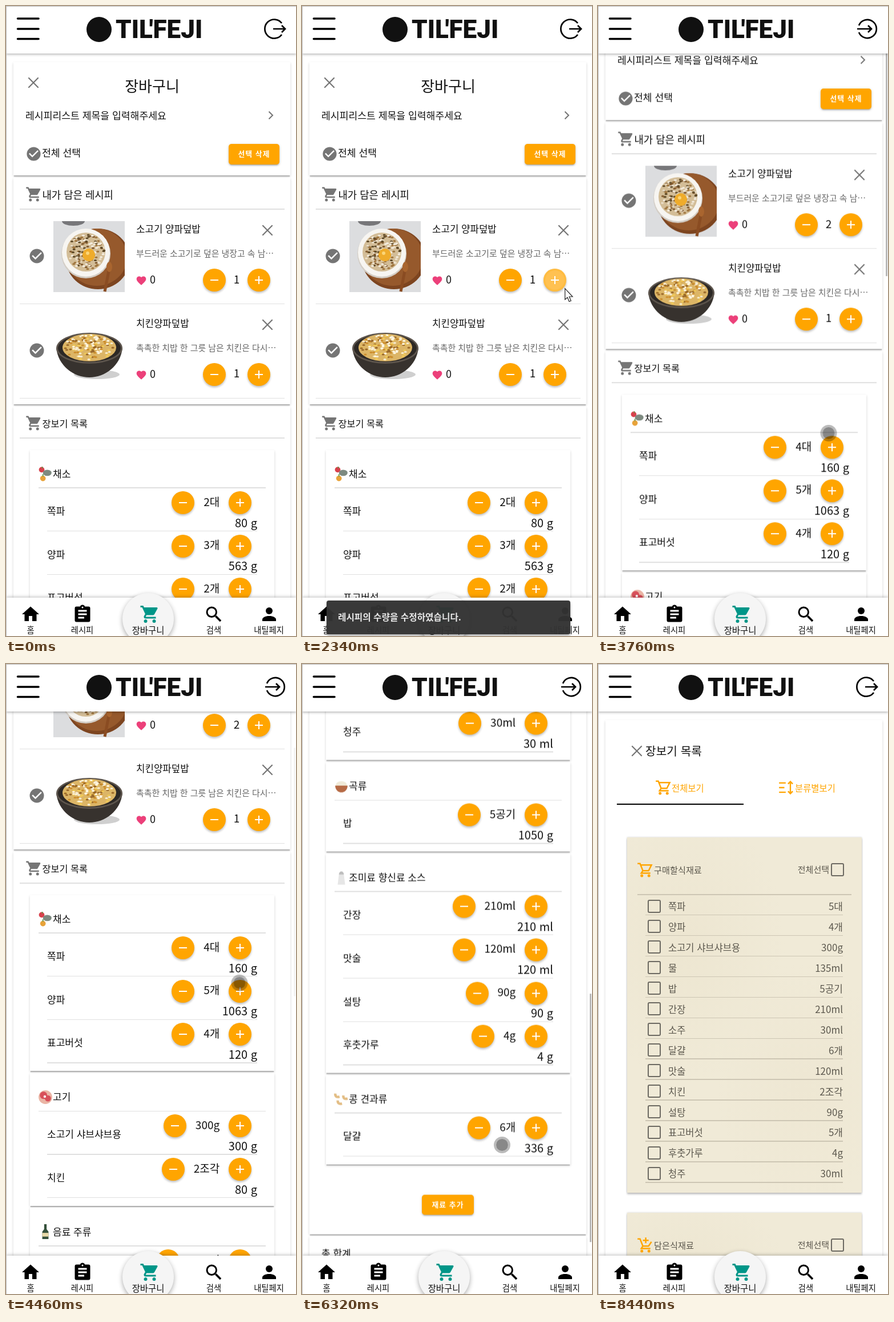
Animation, 508 px wide and 1101 px high, one loop 8.7 s. Source, as an HTML page:

```html
<!DOCTYPE html>
<html lang="ko">
<head>
<meta charset="utf-8">
<title>장바구니</title>
<style>
html, body { margin: 0; width: 100%; height: 100%; overflow: hidden; background: #fff; }
body { font-family: "Noto Sans CJK KR", "Noto Sans CJK JP", "Noto Sans CJK", sans-serif; color: #111; }
#stage { position: relative; width: 508px; height: 1101px; overflow: hidden; }
#stage div { position: absolute; box-sizing: border-box; }
#stage svg { display: block; width: 100%; height: 100%; overflow: visible; }
#stage .t { white-space: pre; line-height: 30px; margin-top: -16px; }
.page, .layer { left: 0; top: 0; width: 508px; height: 2800px; }
.card { background: #fff; box-shadow: 0 3px 1px -1px #0003, 0 2px 4px #0000002e; }
.line { background: #e0e0e0; }
.btn { background: #ffa500; border-radius: 5px; color: #fff; font-weight: 700; letter-spacing: 1.1px; text-align: center;
  box-shadow: 0 3px 2px -2px #0003, 0 2px 3px #0002, 0 1px 5px #0002; }
#stage .qty { display: flex; align-items: center; height: 40px; }
#stage .qty > * { position: static; }
.qty span { font-size: 19px; line-height: 30px; margin-top: -5px; }
.rnd { width: 40px; height: 40px; padding: 8px; border-radius: 50%; background: #ffa500;
  box-shadow: 0 3px 4px -1px #0003, 0 2px 4px #0002; }
.ripple { border-radius: 50%; background: radial-gradient(#fff 16px, #fffc 17px); }
.photo { overflow: hidden; }
.paper { background: radial-gradient(ellipse at 25% 30%, #ede6d1, #0000 40%), radial-gradient(ellipse at 75% 70%, #eee7d3, #0000 35%), #f0ead7;
  box-shadow: 0 3px 3px #0003, 0 0 3px #0003; color: #5c584e; }
.paper .line { background: #cdc6b4; }
.check { border: 2px solid #6d6a62; border-radius: 3px; }
#header { left: 0; top: 0; width: 508px; height: 83px; background: #fff; box-shadow: 0 2px 4px #0004; }
#nav { left: 0; top: 1034px; width: 508px; height: 67px; background: #fff; box-shadow: 0 -2px 5px #0003; }
.disc { border-radius: 50%; background: #f5f5f5; box-shadow: 0 3px 8px #0005; }
.snack { background: #333; border-radius: 4px; color: #e8e8e8; box-shadow: 0 3px 5px #0005; }
.touch { border-radius: 50%; background: #0007; background-clip: padding-box; border: 4px solid #0004; }
.thumb { background: #b9b9b9; }
.edge { border: solid #bbb; border-width: 1px 0 0 1px; }
</style>
</head>
<body>
<div id="stage"></div>
<script>
const LOOP = 8700, ORANGE = '#ffa500', GRAY = '#757575';
const stage = document.getElementById('stage');

// ---- drawing helpers ----
function add(parent, cls, x, y, w, h) {
  const el = document.createElement('div');
  el.className = cls;
  if (x !== undefined) Object.assign(el.style, { left: x + 'px', top: y + 'px', width: w + 'px', height: h + 'px' });
  parent.append(el);
  return el;
}
function text(parent, str, x, y, size = 17, align = 'l', color = '', weight = 400) {
  const el = add(parent, 't');
  el.textContent = str;
  Object.assign(el.style, { left: x + 'px', top: y + 'px', fontSize: size + 'px', color, fontWeight: weight });
  if (align !== 'l') el.style.transform = `translateX(${align === 'c' ? -50 : -100}%)`;
  return el;
}
function art(parent, x, y, w, h, body, view = `0 0 ${w} ${h}`, attrs = '') {
  const el = add(parent, '', x, y, w, h);
  el.innerHTML = `<svg viewBox="${view}" ${attrs}>${body}</svg>`;
  return el;
}
const icon = (p, x, y, size, body, color = GRAY) =>
  art(p, x - size / 2, y - size / 2, size, size, body, '0 0 24 24', `fill="${color}"`);
const stroke = (d, color, width = 2) => `<path d="${d}" fill="none" stroke="${color}" stroke-width="${width}"/>`;
const fill = d => `<path d="${d}"/>`;
const dot = (x, y, rx, color, ry = rx) => `<ellipse cx="${x}" cy="${y}" rx="${rx}" ry="${ry}" fill="${color}"/>`;
const line = (p, x1, x2, y) => add(p, 'line', x1, y - .7, x2 - x1, 1.4);
const cross = (p, x, y, color = GRAY) => icon(p, x, y, 32, stroke('M5.5 5.5L18.5 18.5M18.5 5.5L5.5 18.5', color, 1.6));
function button(p, label, x, y, w, h, size) {
  const el = add(p, 'btn', x, y, w, h);
  Object.assign(el.style, { fontSize: size + 'px', lineHeight: h - 2 + 'px' });
  el.textContent = label;
}

const ICON = {
  cart: fill('M17,18C15.9,18 15,18.9 15,20A2,2 0 0,0 19,20C19,18.9 18.1,18 17,18M1,2V4H3L6.6,11.6L5.2,14C5.1,14.3 5,14.6 5,15A2,2 0 0,0 7,17H19V15H7.4A.25,.25 0 0,1 7.2,14.6L8.1,13H15.5C16.3,13 17,12.6 17.3,12L20.9,5.5A1,1 0 0,0 20,4H5.2L4.3,2M7,18C5.9,18 5,18.9 5,20A2,2 0 0,0 9,20C9,18.9 8.1,18 7,18Z'),
  home: fill('M10,20V14H14V20H19V12H22L12,3L2,12H5V20H10Z'),
  clip: fill('M17,9H7V7H17M17,13H7V11H17M14,17H7V15H14M12,3A1,1 0 0,1 12,5A1,1 0 0,1 12,3M19,3H14.8C14.4,1.8 13.3,1 12,1C10.7,1 9.6,1.8 9.2,3H5A2,2 0 0,0 3,5V19A2,2 0 0,0 5,21H19A2,2 0 0,0 21,19V5A2,2 0 0,0 19,3Z'),
  find: stroke('M14.2 14.2L20 20', '#000', 2.4) + '<circle cx="9.5" cy="9.5" r="5.5" fill="none" stroke="#000" stroke-width="2"/>',
  user: dot(12, 8, 4, '#000') + fill('M12,14C16.4,14 20,15.8 20,18V20H4V18C4,15.8 7.6,14 12,14Z'),
  checked: dot(12, 12, 10, GRAY) + stroke('M5.7 11.3L10 15.6L18.3 7.3', '#fff'),
  unchecked: `<circle cx="12" cy="12" r="9" fill="none" stroke="${GRAY}" stroke-width="1.7"/>` + stroke('M7 12L10.5 15.5L17 8.5', GRAY, 1.7),
  heart: fill('M12,21.3L10.5,20C5.4,15.4 2,12.3 2,8.5C2,5.4 4.4,3 7.5,3C9.2,3 10.9,3.8 12,5.1C13.1,3.8 14.8,3 16.5,3C19.6,3 22,5.4 22,8.5C22,12.3 18.6,15.4 13.4,20Z'),
  trolley: stroke('M1 3H4.5L8.5 13H16.5L20.5 5H6M8.5 13L6.3 16.3H19', ORANGE) + dot(7, 20, 2, ORANGE) + dot(17, 20, 2, ORANGE),
  trolleyPlus: stroke('M1 3H4.5L8.5 13H16.5L20.5 7M8.5 13L6.3 16.3H19M12.5 1V9M8.5 5H16.5', ORANGE) + dot(7, 20, 2, ORANGE) + dot(17, 20, 2, ORANGE),
  sort: stroke('M1 5H11M1 12H9M1 19H11M18 3V21M14.5 6.5L18 3L21.5 6.5M14.5 17.5L18 21L21.5 17.5', ORANGE),
  minus: stroke('M5 12H19', '#fff'),
  plus: stroke('M5 12H19M12 5V19', '#fff'),
};
const FOOD = {
  veg: dot(6, 5, 4.5, '#d8414c') + dot(15, 10, 7, '#7d8a80', 5) + dot(8, 19, 4.5, '#e8a33a') + stroke('M7 0V3M8 12V16', '#5f9a4a', 1.5),
  meat: dot(12, 12, 11, '#eab5a5') + dot(9, 9, 6, '#d8505a') + dot(16, 14, 5, '#d8505a') + dot(11, 11, 2, '#fff'),
  bottle: '<path d="M10 0H14V8L17 12V24H7V12L10 8Z" fill="#35513b"/><path d="M7 14H17V20H7Z" fill="#e8d9a8"/>',
  rice: dot(12, 10, 9, '#f0ead8', 6) + '<path d="M2 11H22C22 18 17 22 12 22S2 18 2 11Z" fill="#b66a45"/>',
  salt: '<path d="M8 7H16L18 23H6Z" fill="#e6e6e6"/><path d="M8 7C8 0 16 0 16 7Z" fill="#bdbdbd"/>',
  nuts: [[5, 6], [18, 9], [9, 17]].map(([x, y]) => stroke(`M${x - 3} ${y - 3}Q${x - 3} ${y + 4} ${x + 4} ${y + 2}`, '#e3bd84', 4)).join(''),
};

let seed = 7;
const rnd = () => (seed = seed * 16807 % 2147483647) / 2147483647;
function crumbs(n, cx, cy, rx, ry, colors) {
  let out = '';
  for (let i = 0; i < n; i++) {
    const a = rnd() * 6.283, r = Math.sqrt(rnd());
    out += dot((cx + Math.cos(a) * r * rx).toFixed(1), (cy + Math.sin(a) * r * ry).toFixed(1), 2.6, colors[i % colors.length], 1.6);
  }
  return out;
}
const PHOTO = [
  '<path d="M0 0H125V124H0Z" fill="#dcdddf"/>' + dot(35, 0, 20, '#77777a', 8) + dot(78, 66, 56, '#7d4520', 53) + dot(76, 63, 53, '#96592c', 50) +
  dot(57, 57, 43, '#d3cdc5') + dot(57, 55, 42, '#f7f5f1') + dot(57, 54, 34, '#d3bd97') +
  crumbs(150, 57, 54, 32, 31, ['#80592f', '#f4ede0', '#a0763f', '#5f4a28', '#ece0ca']) + dot(62, 59, 11, '#efac2b') + dot(60, 56, 3, '#fbd678') +
  stroke('M98 82L90 123', '#8a4c22', 5) + dot(98, 80, 5, '#a9652f', 9),
  dot(76, 103, 40, '#cfcfcf', 8) + '<path d="M5 56C8 88 36 108 63 108S118 88 121 56Z" fill="#37322e"/>' +
  dot(63, 57, 58, '#5d554d', 27) + dot(63, 57, 55, '#2c2825', 24) + dot(63, 56, 47, '#dcb566', 24) +
  crumbs(140, 63, 56, 45, 22, ['#f6ecd2', '#cc8d2c', '#f1ca57', '#99682a', '#fff6e0']),
];

// ---- motion helpers ----
function play(el, prop, steps) {
  const frames = steps.map(([t, v, easing = 'linear']) => ({ offset: t / LOOP, [prop]: v, easing }));
  if (steps[0][0] > 0) frames.unshift({ ...frames[0], offset: 0, easing: 'step-end' });
  if (steps.at(-1)[0] < LOOP) frames.push({ ...frames.at(-1), offset: 1 });
  el.animate(frames, { duration: LOOP, iterations: Infinity });
}
const show = (el, steps) => play(el, 'opacity', steps.map(([t, v]) => [t, v, 'step-end']));
const move = (el, steps) => play(el, 'transform', steps.map(([t, x, y, e]) => [t, `translate(${x}px,${y}px)`, e]));
const during = (el, from, to) => show(el, [[0, from ? 0 : 1], ...(from ? [[from, 1]] : []), ...(to < LOOP ? [[to, 0]] : [])]);

// Stepper whose label changes at the given times: [time, count, weight]
function stepper(p, right, y, gap, states) {
  states.forEach(([t, count, weight], i) => {
    const g = add(p, 'layer');
    const q = add(g, 'qty');
    Object.assign(q.style, { right: 508 - right + 'px', top: y - 20 + 'px', gap: gap + 'px' });
    q.innerHTML = ['minus', 'plus'].map(k => `<div class="rnd"><svg viewBox="0 0 24 24">${ICON[k]}</svg></div>`).join(`<span>${count}</span>`);
    if (weight) text(g, weight, right + 10, y + 35.5, 20, 'r', '', 300);
    if (states.length > 1) during(g, t, i + 1 < states.length ? states[i + 1][0] : LOOP);
  });
}
function tap(p, x, y, from, to, level = .32) {
  const r = add(p, 'ripple', x - 20, y - 20, 40, 40);
  play(r, 'opacity', [[from, 0], [from + 90, level], [to, level], [to + 200, 0]]);
}

// ---- cart pages ----
function topCard(p, mark) {
  add(p, 'card', 13, 98, 485, 198);
  cross(p, 48, 134);
  text(p, '장바구니', 256, 140, 26, 'c');
  text(p, '레시피리스트 제목을 입력해주세요', 34, 192, 17.2);
  icon(p, 464, 191, 24, stroke('M8.5 5.5L15 12L8.5 18.5', GRAY));
  icon(p, 48, 258, 29, mark);
  text(p, '전체 선택', 63, 257, 17.2);
  button(p, '선택 삭제', 390, 241, 89, 36, 12.8);
}
function heading(p, label, y, size) {
  icon(p, 49, y - 1, 30, ICON.cart);
  text(p, label, 63.5, y, size);
  line(p, 24, 488, y + 25);
}
function totals(p, y, dishes, items) {
  add(p, 'card', 13, y, 485, 168);
  text(p, '총 합계', 34, y + 31);
  [['총 요리 수', dishes], ['총 재료 수', items]].forEach(([label, n], i) => {
    line(p, 24, 488, y + 56 + i * 51);
    text(p, label, 34, y + 82 + i * 51);
    text(p, n, 478, y + 82 + i * 51, 18, 'r');
  });
  button(p, '장보기', 14, y + 182, 484, 54, 14);
}

const cart = add(stage, 'page');
topCard(cart, ICON.checked);
add(cart, 'card', 13, 300, 485, 396);
heading(cart, '내가 담은 레시피', 330, 17.8);
[['소고기 양파덮밥', '부드러운 소고기로 덮은 냉장고 속 남…', [[0, 1], [2410, 2]]],
 ['치킨양파덮밥', '촉촉한 치밥 한 그릇 남은 치킨은 다시…', [[0, 1]]]].forEach(([name, note, count], i) => {
  const y = 356 + i * 164.7;
  icon(cart, 53.5, y + 81, 30, ICON.checked);
  art(cart, 83, y + 20, 125, 124, PHOTO[i]).className = 'photo';
  text(cart, name, 228, y + 34, 16.8);
  cross(cart, 458, y + 36);
  text(cart, note, 228, y + 77, 14.9, 'l', '#666');
  icon(cart, 237, y + 124, 20, ICON.heart, '#ec407a');
  text(cart, '0', 252, y + 122, 18);
  stepper(cart, 463, y + 123, 13.7, count);
  line(cart, 24, 488, y + 164.5);
});
add(cart, 'card', 13, 700, 485, 1759);
heading(cart, '장보기 목록', 730, 16.3);

const GROUPS = [
  ['채소', 'veg', [
    ['쪽파', [[0, '2대', '80 g'], [2410, '4대', '160 g'], [4760, '5대', '200 g']]],
    ['양파', [[0, '3개', '563 g'], [2410, '5개', '1063 g'], [5760, '4개', '813 g']]],
    ['표고버섯', [[0, '2개', '60 g'], [2410, '4개', '120 g'], [5500, '5개', '150 g']]]]],
  ['고기', 'meat', [
    ['소고기 샤브샤브용', [[0, '150g', '150 g'], [2410, '300g', '300 g']]],
    ['치킨', [[0, '2조각', '80 g']]]]],
  ['음료 주류', 'bottle', [
    ['물', [[0, '135ml', '135 ml']]], ['소주', [[0, '30ml', '30 ml']]], ['청주', [[0, '30ml', '30 ml']]]]],
  ['곡류', 'rice', [['밥', [[0, '5공기', '1050 g']]]]],
  ['조미료 향신료 소스', 'salt', [
    ['간장', [[0, '210ml', '210 ml']]], ['맛술', [[0, '120ml', '120 ml']]],
    ['설탕', [[0, '90g', '90 g']]], ['후춧가루', [[0, '4g', '4 g']]]]],
  ['콩 견과류', 'nuts', [['달걀', [[0, '6개', '336 g']]]]],
];
let top0 = 775.5;
for (const [label, pic, rows] of GROUPS) {
  const h = 84.2 + rows.length * 75.7;
  add(cart, 'card', 42, top0, 428, h - 3.5);
  icon(cart, 69, top0 + 42, 26, FOOD[pic]);
  text(cart, label, 82, top0 + 42.5);
  line(cart, 57, 455, top0 + 66.5);
  rows.forEach(([name, states], i) => {
    const y = top0 + 66.5 + i * 75.7;
    text(cart, name, 72, y + 41);
    stepper(cart, 430, y + 26, 15.8, states);
    line(cart, 72, 440, y + 75.7);
  });
  top0 += h;
}
button(cart, '재료 추가', 210, 2390, 91, 35, 12.8);
totals(cart, 2462, '2', '14');
tap(cart, 443, 479, 1900, 2450);
tap(cart, 410, 868, 4660, 5420, .27);
tap(cart, 410, 1019, 5390, 5640);
tap(cart, 311, 943, 5690, 5780);
show(cart, [[0, 1], [2870, 0], [3140, 1], [7400, 0]]);

const END = 1693;
move(cart, [[3280, 0, 0, 'ease-in'], [3760, 0, -96], [4120, 0, -372], [6010, 0, -372, 'cubic-bezier(.3,.1,.4,1)'], [6530, 0, -END]]);

const empty = add(stage, 'page');
topCard(empty, ICON.unchecked);
const none = add(empty, 'layer');
add(none, 'card', 13, 325, 485, 129);
heading(none, '내가 담은 레시피', 359, 17.8);
text(none, '담긴 레시피가 없습니다.', 256, 416, 17.4, 'c');
add(none, 'card', 13, 458, 485, 216);
heading(none, '장보기 목록', 489, 16.3);
text(none, '담긴 재료가 없습니다.', 256, 546, 17.4, 'c');
button(none, '재료 추가', 210, 604, 91, 35, 12.8);
totals(none, 677, '0', '0');
during(empty, 2870, 3140);
play(none, 'opacity', [[2870, .2], [3010, .76], [3080, 1]]);

// ---- shopping list page ----
const list = add(stage, 'page');
add(list, 'card', 13, 98, 485, 1500);
cross(list, 68, 152);
text(list, '장보기 목록', 83, 152, 20.3);
icon(list, 115, 216, 30, ICON.trolley);
text(list, '전체보기', 129, 217, 15.4, 'l', ORANGE, 500);
icon(list, 330, 216, 28, ICON.sort);
text(list, '분류별보기', 345, 217, 15.4, 'l', ORANGE, 500);
add(list, '', 33, 243.5, 222, 2.5).style.background = '#000';
function paper(p, y, h, label, pic) {
  const el = add(p, 'paper', 51, y, 411, h);
  icon(el, 32, 57, 30, pic);
  text(el, label, 47, 56.5, 15.2);
  text(el, '전체선택', 354, 57, 15, 'r');
  add(el, 'check', 357, 45, 23, 23);
  line(el, 18, 393, 100);
  return el;
}
const sheets = add(list, 'layer');
const buy = paper(sheets, 303, 621, '구매할식재료', ICON.trolley);
paper(sheets, 959, 300, '담은식재료', ICON.trolleyPlus);
['쪽파 5대', '양파 4개', '소고기 샤브샤브용 300g', '물 135ml', '밥 5공기', '간장 210ml', '소주 30ml', '달걀 6개', '맛술 120ml',
 '치킨 2조각', '설탕 90g', '표고버섯 5개', '후춧가루 4g', '청주 30ml'].forEach((item, i) => {
  const cut = item.lastIndexOf(' '), y = 120 + i * 35.95;
  add(buy, 'check', 35.5, y - 11.5, 23, 23);
  text(buy, item.slice(0, cut), 72, y + 1, 16.5);
  text(buy, item.slice(cut + 1), 378, y + 1, 17, 'r');
  line(buy, 32, 378, y + 15.5);
});
play(list, 'opacity', [[7400, 0], [7530, 1]]);
play(sheets, 'opacity', [[7620, 0], [7800, 1]]);

// ---- scroll thumb, header, navigation ----
const thumb = add(stage, 'thumb', 503.5, 0, 3.5, 434);
const RATIO = .394;
move(thumb, [[3280, 0, 0, 'ease-in'], [3760, 0, 96 * RATIO], [4120, 0, 372 * RATIO], [6010, 0, 372 * RATIO, 'cubic-bezier(.3,.1,.4,1)'],
  [6530, 0, END * RATIO, 'step-end'], [7400, 0, 2]]);
play(thumb, 'opacity', [[3279, 0], [3280, 1], [4250, 1], [4500, 0], [6009, 0], [6010, 1], [6740, 1], [6950, 0], [7440, 0], [7480, 1], [7900, 1], [8150, 0]]);

const header = add(stage, '');
header.id = 'header';
art(header, 0, 0, 508, 83, '<path d="M20.5 22H57M20.5 40H57M20.5 57.5H57" stroke="#000" stroke-width="3.6" stroke-linecap="round"/>' + dot(163, 41, 22, '#111'));
const brand = text(header, "TIL'FEJI", 192, 42, 44, 'l', '#111', 800);
brand.style.fontFamily = 'Roboto, sans-serif';
const gate = d => art(header, 0, 0, 508, 83, stroke(d, '#000', 2.7));
const leave = gate('M483 30A16.5 16.5 0 1 0 483 50M468 40H489M483 34L489 40L483 46');
const enter = gate('M457 34A16 16 0 1 1 457 46M454 40H479M473 34L479 40L473 46');
show(leave, [[0, 1], [2870, 0], [7400, 1]]);
show(enter, [[0, 0], [2870, 1], [7400, 0]]);

add(stage, '').id = 'nav';
add(stage, 'disc', 204, 1026, 90, 90);
[['홈', 43, 'home'], ['레시피', 133.5, 'clip'], ['장바구니', 249, 'cart'], ['검색', 364, 'find'], ['내틸페지', 460.5, 'user']].forEach(([label, x, pic]) => {
  const on = pic === 'cart';
  icon(stage, on ? 251.5 : x, 1062.5, 36, ICON[pic], on ? '#009688' : '#000');
  text(stage, label, x, 1090.5, on ? 15.4 : 14.3, 'c');
});

// ---- messages ----
function snack(str, from, to) {
  const el = add(stage, 'snack', 43, 1039, 427, 59);
  text(el, str, 20, 29.5, 15.7, 'l', '', 700);
  play(el, 'opacity', [[from, 0], [from + 140, 1], [to, 1], [to + 120, 0]]);
  play(el, 'transform', [[from, 'scale(.85)'], [from + 130, 'scale(1)']]);
}
snack('레시피의 수량을 수정하였습니다.', 2205, 2750);
snack('재료의 수량을 수정하였습니다.', 4800, 6200);

// ---- pointers ----
const arrow = art(stage, 0, 0, 16, 25, '<path d="M.7 .7V20L5 16.2L8 23.5L11.2 22.2L8.2 15H14Z" fill="#fff" stroke="#222" stroke-width="1.2"/>');
move(arrow, [[0, 470, 1082], [200, 470, 1082, 'step-end'], [530, 495, 655, 'ease-out'], [780, 320, 540], [1000, 100, 400], [1140, 190, 322],
  [1390, 400, 460], [1600, 482, 520, 'ease-in-out'], [1850, 460, 493], [2400, 460, 493, 'ease-in'], [2690, 430, 650]]);
show(arrow, [[0, 0], [130, 1], [200, 0], [530, 1], [2690, 0]]);

const touch = add(stage, 'touch', -14.5, -14.5, 29, 29);
move(touch, [[2690, 430, 650, 'ease-out'], [2900, 403.5, 746], [4190, 403.5, 746, 'ease-in-out'], [4600, 410, 497], [5120, 410, 497, 'ease-in-out'],
  [5340, 415, 656], [5480, 415, 656, 'ease-in-out'], [5680, 311, 573], [5780, 311, 573, 'ease-in-out'], [5940, 350, 840],
  [6730, 350, 840, 'ease-in-out'], [7120, 287, 983], [7620, 287, 983, 'ease-in'], [8350, 380, 1080]]);
show(touch, [[0, 0], [2690, 1], [8380, 0]]);

add(stage, 'edge', 0, 0, 508, 1101);
</script>
</body>
</html>
```
